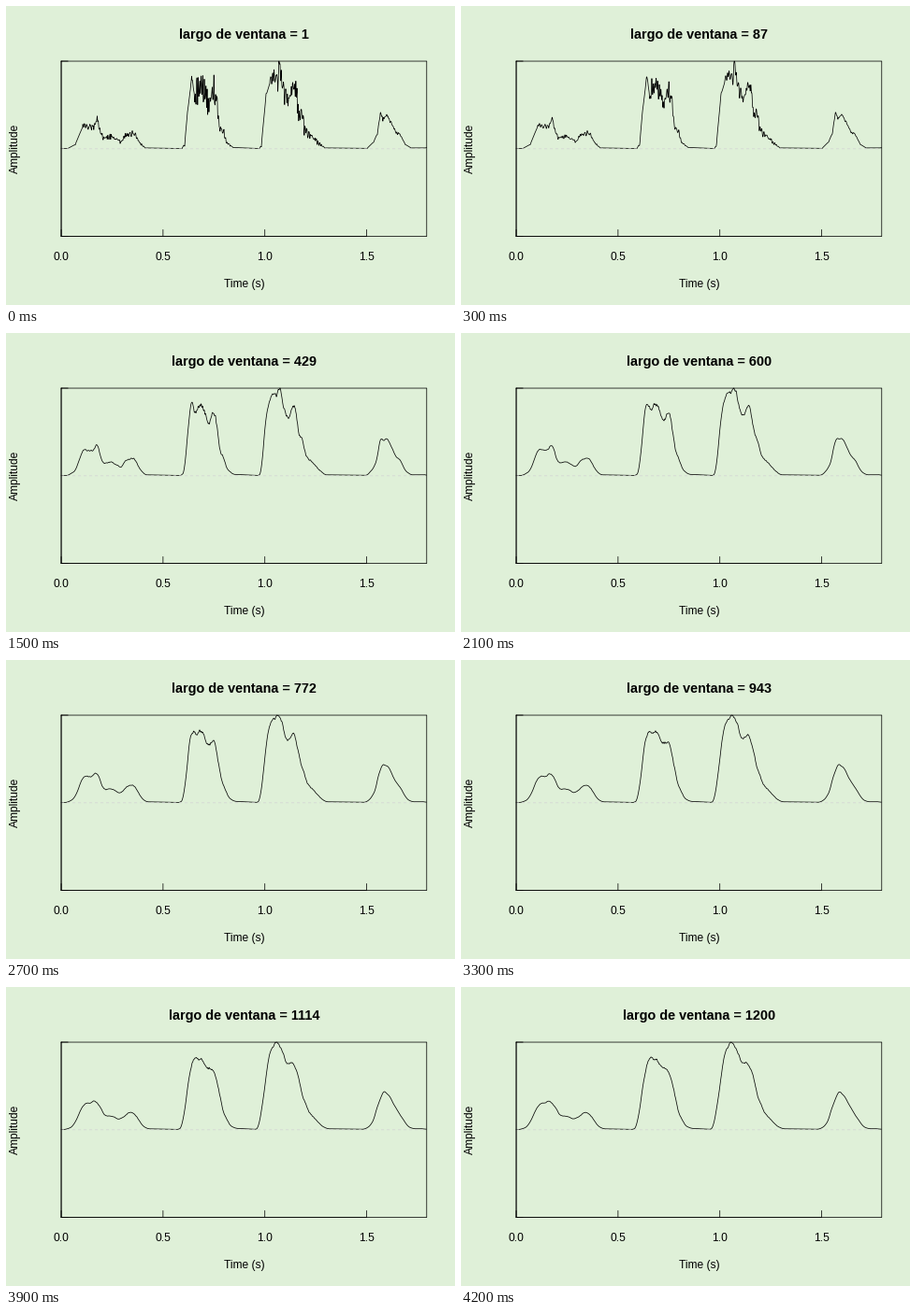
A matplotlib script that plays this animation: 480 by 320 pixels, repeating every 4500 ms.

```python
import numpy as np
import matplotlib.pyplot as plt
from matplotlib.animation import FuncAnimation

W, H, DPI = 480, 320, 100
PX = 72 / DPI                      # points per pixel
LEFT, RIGHT, TOP, BOTTOM = 59.04, 449.76, 59.04, 246.56
MID_X, MID_Y = (LEFT + RIGHT) / 2, (TOP + BOTTOM) / 2
DURATION, RATE, STEP = 1.795, 22050, 10
FRAMES, INTERVAL = 15, 300
MAX_WINDOW = 1200
SCALE = (RIGHT - LEFT) / DURATION  # pixels per second

plt.rcParams["path.simplify"] = False
plt.rcParams["font.family"] = "Liberation Sans"

# Loudness outline of the four syllables: (x, height) in pixels.
OUTLINE = [
    (66, .3), (74, 5), (79, 18), (83, 28), (88, 26), (94, 25), (97.5, 35),
    (101, 19), (104, 13), (113, 14), (123, 8), (128, 16), (137, 18),
    (143, 7), (149, 1),
    (188, .3), (191, 6), (194, 42), (198.5, 82), (202, 60), (207, 74),
    (212, 69), (217, 49), (219, 62), (222, 68), (226, 51), (228, 28),
    (233, 18), (236, 7), (243, 1.5),
    (271, .3), (273, 5), (275, 28), (278, 62), (283, 80), (287, 85),
    (290, 83), (292.5, 95), (295, 77), (302, 55), (304, 62), (306.5, 74),
    (310, 71), (313, 38), (316, 39), (320, 20), (328, 13), (334, 7),
    (341, 1),
    (386, .5), (393, 8), (397, 18), (400, 40), (403, 35), (407, 39),
    (412, 30), (417, 19), (421, 17), (427, 5), (433, 1),
]
# Voiced stretches with a rough envelope: start, end, strength.
ROUGH = [(82, 147, .16), (197, 240, .18), (282, 311, .13),
         (311, 340, .24), (398, 424, .06)]

t = np.arange(0, DURATION, STEP / RATE)
x = LEFT + t * SCALE


def smooth(y, window):
    """Centred moving average; the window is given in audio samples."""
    width = max(window / STEP, 1)
    total = np.concatenate([[0], np.cumsum(y)])
    edges = np.arange(len(total)) - 0.5
    i = np.arange(len(y))
    upper = np.interp(i + width / 2, edges, total)
    lower = np.interp(i - width / 2, edges, total)
    return (upper - lower) / width


def make_envelope():
    outline = np.interp(x, *np.array(OUTLINE).T)
    outline = 2 * outline - smooth(outline, 258)

    rng = np.random.default_rng(12)
    fine = np.arange(LEFT, RIGHT + 1, 0.6)
    dips = -np.minimum(rng.exponential(1, len(fine)), 3)
    noise = np.interp(x, fine, dips)
    noise -= smooth(noise, 258)
    coarse = np.arange(LEFT, RIGHT + 2, 1.8)
    noise += np.interp(x, coarse, rng.uniform(-0.4, 0.4, len(coarse)))

    strength = np.zeros_like(x)
    for start, end, amount in ROUGH:
        strength[(x >= start) & (x < end)] = amount
    return np.maximum(outline * (1 + strength * noise), 0.2)


envelope = make_envelope()

fig = plt.figure(figsize=(W / DPI, H / DPI), dpi=DPI, facecolor="#dff0d8")
ax = fig.add_axes([0, 0, 1, 1])
ax.set_xlim(0, W)
ax.set_ylim(H, 0)
ax.axis("off")


def line(xs, ys, **style):
    style = {"color": "black", "lw": 0.75 * PX, "snap": False,
             "solid_capstyle": "round", "solid_joinstyle": "round", **style}
    return ax.plot(xs, ys, **style)[0]


def label(x, y, text, size=12, **style):
    return ax.text(x, y, text, fontsize=size * PX, ha="center",
                   va="baseline", rotation_mode="anchor", **style)


curve = line([], [])
line([LEFT, RIGHT], [MID_Y, MID_Y], color="lightgrey",
     dashes=(4, 4), dash_capstyle="butt")

# Frame, then the two axes with inward ticks.
line([LEFT, RIGHT, RIGHT, LEFT, LEFT], [TOP, TOP, BOTTOM, BOTTOM, TOP])
TICK = 7.2
line([LEFT, LEFT], [TOP, BOTTOM])
for y in (TOP, BOTTOM):
    line([LEFT, LEFT + TICK], [y, y])
line([LEFT, LEFT + 1.5 * SCALE], [BOTTOM, BOTTOM])
for value in (0, 0.5, 1, 1.5):
    tick_x = LEFT + value * SCALE
    line([tick_x, tick_x], [BOTTOM, BOTTOM - TICK])
    label(tick_x, 272, f"{value:.1f}")

label(MID_X, 301, "Time (s)")
label(13, MID_Y, "Amplitude", rotation=90)
title = label(MID_X, 35, "", size=14.4, weight="bold")


def update(i):
    window = round(1 + (MAX_WINDOW - 1) * i / (FRAMES - 1))
    level = smooth(envelope, window)
    curve.set_data(x, MID_Y - level / level.max() * (MID_Y - TOP))
    title.set_text(f"largo de ventana = {window}")
    return curve, title


anim = FuncAnimation(fig, update, frames=FRAMES, interval=INTERVAL,
                     repeat=True, repeat_delay=0)
plt.show()
```
